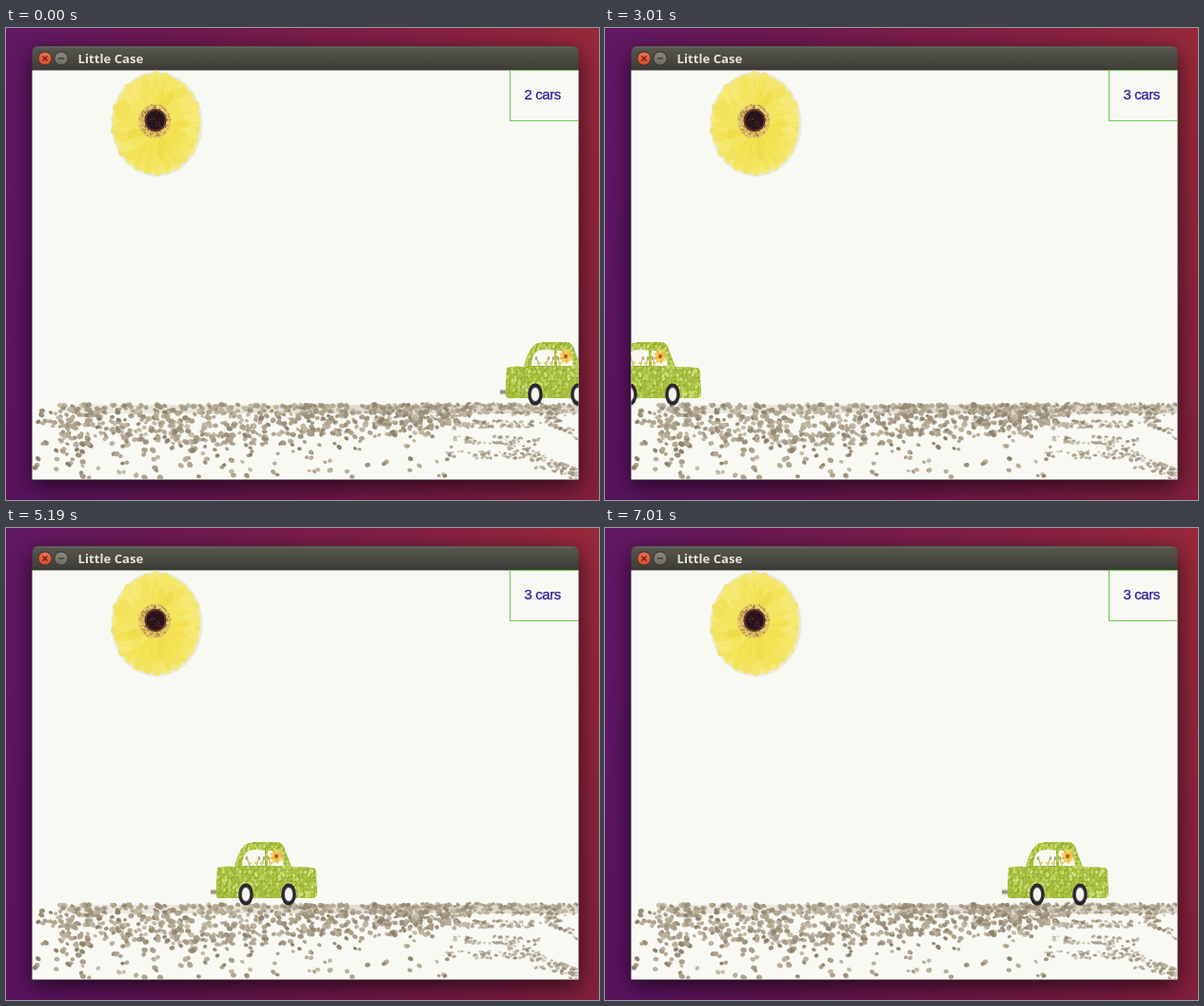
Write an HTML page with a canvas that moves like this. It is 623 by 496 pixels and loops after 7.11 s.

```html
<!DOCTYPE html>
<html lang="en">
<head>
<meta charset="utf-8">
<title>Little Case</title>
<style>
  html, body { margin: 0; width: 100%; height: 100%; overflow: hidden; background: #64154f; }
  canvas { display: block; }
</style>
</head>
<body>
<canvas id="stage" width="623" height="496"></canvas>
<script>
const WIDTH = 623, HEIGHT = 496, LOOP = 7110;
const VIEW = { x: 27.5, y: 44.5, w: 574, h: 430 };
const PAPER = '#f8f9f3';

// The car moves in hard steps at these times.
const STEPS = [0, 140, 263, 387, 510, 650, 780, 2200, 2320, 2470, 2620, 2745, 2870, 3010, 3130, 3250,
  3410, 3560, 3710, 3860, 4010, 4130, 4280, 4400, 4550, 4670, 4790, 4940, 5065, 5190, 5330, 5455,
  5580, 5720, 5840, 6000, 6150, 6270, 6420, 6570, 6710, 6860, 7010];
const LEAVING = [[0, 518], [780, 602]];
const ARRIVING = [[2200, -96], [3010, -12], [4010, 87], [4550, 148], [5840, 281], [7010, 416]];

let seed = 7;
function random() {
  seed = (seed * 16807) % 2147483647;
  return seed / 2147483647;
}
const between = (low, high) => low + (high - low) * random();
const pick = list => list[Math.floor(random() * list.length)];

function layer(width, height, draw) {
  const canvas = document.createElement('canvas');
  canvas.width = width;
  canvas.height = height;
  draw(canvas.getContext('2d'));
  return canvas;
}

function ellipse(c, x, y, rx, ry, fill, angle = 0) {
  c.beginPath();
  c.ellipse(x, y, rx, ry, angle, 0, Math.PI * 2);
  c.fillStyle = fill;
  c.fill();
}

function line(c, x1, y1, x2, y2, color, width = 1) {
  c.beginPath();
  c.moveTo(x1, y1);
  c.lineTo(x2, y2);
  c.strokeStyle = color;
  c.lineWidth = width;
  c.stroke();
}

function gradient(c, x1, y1, x2, y2, ...colors) {
  const g = c.createLinearGradient(x1, y1, x2, y2);
  colors.forEach((color, i) => g.addColorStop(i / (colors.length - 1), color));
  return g;
}

function drawDesktop(c) {
  c.fillStyle = gradient(c, 0, 60, WIDTH, 0, '#601766', '#6b1852', '#7a1c4a', '#872142', '#98283a');
  c.fillRect(0, 0, WIDTH, HEIGHT);
  c.fillStyle = gradient(c, 0, 0, 0, HEIGHT, 'rgba(60,0,60,0)', 'rgba(60,0,60,.18)');
  c.fillRect(0, 0, WIDTH, HEIGHT);
}

function drawWindow(c) {
  c.save();
  c.shadowColor = 'rgba(0,0,0,.65)';
  c.shadowBlur = 24;
  c.shadowOffsetY = 7;
  c.beginPath();
  c.roundRect(VIEW.x, 19, VIEW.w, 455.5, [6, 6, 0, 0]);
  c.fillStyle = gradient(c, 0, 19, 0, 44, '#5a5950', '#4b4a42', '#3c3b36');
  c.fill();
  c.restore();
  line(c, 32, 20.5, 596, 20.5, '#62605a');
  c.fillStyle = PAPER;
  c.fillRect(VIEW.x, VIEW.y, VIEW.w, VIEW.h);

  ellipse(c, 41, 32, 7.5, 7.5, '#33322d');
  ellipse(c, 41, 32, 6.6, 6.6, gradient(c, 0, 25, 0, 39, '#f0724f', '#d8482a'));
  line(c, 38.5, 29.5, 43.5, 34.5, '#6b2413', 1.4);
  line(c, 43.5, 29.5, 38.5, 34.5, '#6b2413', 1.4);
  ellipse(c, 58, 32, 7.5, 7.5, '#33322d');
  ellipse(c, 58, 32, 6.6, 6.6, gradient(c, 0, 25, 0, 39, '#8d8a7f', '#6d6b61'));
  line(c, 55, 32, 61, 32, '#3b3a34', 1.4);

  c.font = 'bold 13.2px "Open Sans", "Noto Sans", sans-serif';
  c.fillStyle = '#e6e2d8';
  c.fillText('Little Case', 75.5, 37);
}

function drawFlower(c) {
  const cx = 158, cy = 100.5;
  const petals = (count, reach, halfWidth, colors, phase) => {
    for (let i = 0; i < count; i++) {
      const length = reach * between(0.96, 1.02);
      c.save();
      c.translate(cx, cy);
      c.scale(0.87, 1);
      c.rotate(phase + i / count * Math.PI * 2);
      ellipse(c, length * 0.55, 0, length * 0.45, halfWidth, pick(colors));
      line(c, length * 0.35, 1, length * 0.9, 1, 'rgba(222,200,60,.35)', 0.8);
      c.restore();
    }
  };
  ellipse(c, cx + 0.5, cy + 0.5, 48, 55, '#ebe9dc');
  ellipse(c, cx, cy, 45.5, 52.5, '#f3e873');
  petals(26, 55, 9, ['#f2e776', '#f5ea80', '#f0e36a'], 0.1);
  petals(24, 52.5, 8, ['#f5e766', '#f3e45c', '#f6ea74'], 0.22);
  petals(18, 40, 6, ['#f4e253', '#f1de4c', '#f5e662'], 0);

  ellipse(c, 156, 98, 17, 18, '#dfc05c');
  for (let i = 0; i < 190; i++) {
    const angle = between(0, Math.PI * 2), r = between(10, 17);
    ellipse(c, 156 + r * Math.cos(angle), 98 + r * 1.05 * Math.sin(angle), 1, 1,
      pick(['#b58c46', '#94683a', '#e6cc74', '#caa552', '#ecd984']));
  }
  ellipse(c, 157, 97, 11.5, 12, '#5a322a');
  ellipse(c, 157, 97, 9.5, 10, '#2a141b');
  for (let i = 0; i < 30; i++) {
    ellipse(c, between(150, 164), between(90, 104), 0.8, 0.8, pick(['#42202a', '#1c0d12', '#55302c']));
  }
}

function pebble(c, x, y, size, flat = 0.78) {
  const angle = between(-0.9, 0.9) * flat;
  ellipse(c, x + 0.4, y + 0.5, size, size * flat, 'rgba(120,106,84,.45)', angle);
  ellipse(c, x, y, size, size * flat, pick(['#ab9f88', '#9c8f78', '#b9ae98', '#c3b9a4', '#8f826c', '#b0a48e']), angle);
}

function streak(c, x1, y1, x2, y2, count, spread) {
  for (let i = 0; i < count; i++) {
    const u = random();
    c.globalAlpha = between(0.4, 0.85);
    pebble(c, x1 + (x2 - x1) * u, y1 + (y2 - y1) * u + between(-spread, spread), between(1.4, 2.6), 0.6);
  }
  c.globalAlpha = 1;
}

function drawGround(c) {
  c.fillStyle = gradient(c, 60, 0, 601, 0, 'rgba(190,180,160,.2)', 'rgba(185,175,155,.35)', 'rgba(200,190,170,.55)');
  c.fillRect(62, 396, 539, 9);

  // Dense verge, thinning downwards and to the right.
  for (let i = 0; i < 740; i++) {
    const x = between(56, 490);
    const depth = x < 300 ? 42 : x < 450 ? 34 : 25;
    c.globalAlpha = between(0.65, 1);
    pebble(c, x, 395.5 + depth * Math.pow(random(), 1.3), between(1.8, 3.2));
  }
  streak(c, 380, 397, 601, 397, 140, 3);
  streak(c, 480, 402, 601, 403, 85, 4);
  streak(c, 385, 406, 460, 412, 75, 10);
  streak(c, 490, 416, 578, 417, 65, 4);
  streak(c, 470, 432, 560, 434, 45, 4);
  streak(c, 460, 447, 540, 449, 40, 4);
  streak(c, 565, 406, 600, 429, 38, 5);
  streak(c, 525, 437, 600, 470, 65, 7);
  streak(c, 555, 457, 600, 466, 25, 5);

  // Loose stones.
  for (let i = 0; i < 13; i++) pebble(c, between(31, 58), between(402, 420), between(1.8, 3));
  for (let i = 0; i < 95; i++) pebble(c, between(30, 255), between(428, 473), between(2, 3.2));
  for (let i = 0; i < 48; i++) pebble(c, between(255, 470), between(428, 473), between(1.8, 2.9));
}

function drawCounterBox(c) {
  c.strokeStyle = '#66cc52';
  c.lineWidth = 1;
  c.strokeRect(529.5, 44.5, 80, 53);
}

const backdrop = layer(WIDTH, HEIGHT, c => {
  drawDesktop(c);
  drawWindow(c);
  c.beginPath();
  c.rect(VIEW.x, 44, VIEW.w, VIEW.h);
  c.clip();
  drawFlower(c);
  drawGround(c);
  drawCounterBox(c);
});

// The car's layer starts at its tailpipe, 325 px down the stage.
const CAR_TOP = 325;
const car = layer(120, 80, c => {
  const body = new Path2D('M8 32 Q16 30 26 31 Q29 17 37 8 Q42 5 52 5 L72 5 Q77 6 79 13 Q82 22 86 31 ' +
    'L109 32 Q113 34 112 43 L113 60 Q112 64 106 64 L10 64 Q6 63 7 56 Z');
  const windows = new Path2D('M34 30 Q34 18 41 14 Q49 12 58 14 L58 30 Z M61 14 L72 14 Q76 19 78 30 L61 30 Z');

  c.fillStyle = '#b5b2a0';
  c.fillRect(1, 55, 7, 5);
  line(c, 1, 57.5, 8, 57.5, '#77746a');

  c.save();
  c.clip(body);
  c.fillStyle = '#a9bf3f';
  c.fillRect(0, 0, 120, 80);
  for (let y = 5; y < 66; y += 4) {
    for (let x = 5; x < 115; x += 4) {
      const px = x + between(-1.5, 1.5), py = y + between(-1.5, 1.5), angle = between(0.7, 2.4);
      ellipse(c, px + 0.6, py + 0.8, 2.4, 1.7, pick(['#7f9a2a', '#8ca632', '#86a02c']), angle);
      ellipse(c, px, py, 2.2, 1.6, pick(['#b3cb48', '#c0d65e', '#a6c03e', '#cde07a']), angle);
    }
  }
  c.restore();

  c.fillStyle = '#f7f8ee';
  c.fill(windows);
  // Sprigs in the rear window, a blossom in the front one.
  for (const [x, lean] of [[42, -3], [49, 3], [55, 2], [64, -2]]) {
    line(c, x, 30, x + lean, 21, '#a3ac6c');
    ellipse(c, x + lean, 22, 1.3, 2, '#b0a97c');
    ellipse(c, x, 27, 2.2, 1.2, '#dccf78');
  }
  for (let i = 0; i < 9; i++) {
    const angle = i / 9 * Math.PI * 2;
    ellipse(c, 70 + 4 * Math.cos(angle), 20 + 4.5 * Math.sin(angle), 3, 1.7, i % 2 ? '#f2d058' : '#ecbc48', angle);
  }
  ellipse(c, 70, 20, 2, 2.3, '#b0582c');

  for (const x of [38, 83]) {
    ellipse(c, x, 60, 7.8, 11.6, '#2b262e');
    ellipse(c, x, 60, 5.1, 8.2, '#57515a');
    ellipse(c, x, 60, 4.1, 7, '#f4f3ee');
  }
});

function carX(time) {
  const path = time < 2200 ? LEAVING : ARRIVING;
  let i = 1;
  while (i < path.length - 1 && time > path[i][0]) i++;
  const [t0, x0] = path[i - 1], [t1, x1] = path[i];
  return Math.round(x0 + (x1 - x0) * Math.min(1, (time - t0) / (t1 - t0)));
}

const stage = document.getElementById('stage').getContext('2d');

function drawCount(count) {
  stage.font = '15px "Liberation Sans", Arial, sans-serif';
  stage.letterSpacing = '-0.4px';
  stage.fillStyle = stage.strokeStyle = '#2c1c9c';
  stage.lineWidth = 0.25;
  stage.fillText(`${count} cars`, 544.5, 75);
  stage.strokeText(`${count} cars`, 544.5, 75);
}

function render(time) {
  const step = STEPS.findLast(start => start <= time);
  stage.drawImage(backdrop, 0, 0);
  stage.save();
  stage.beginPath();
  stage.rect(VIEW.x, VIEW.y, VIEW.w, VIEW.h);
  stage.clip();
  stage.drawImage(car, carX(step), CAR_TOP);
  stage.restore();
  drawCount(step < 2200 ? 2 : 3);
}

const started = performance.now();
function tick() {
  render((performance.now() - started) % LOOP);
  requestAnimationFrame(tick);
}
tick();
</script>
</body>
</html>
```
